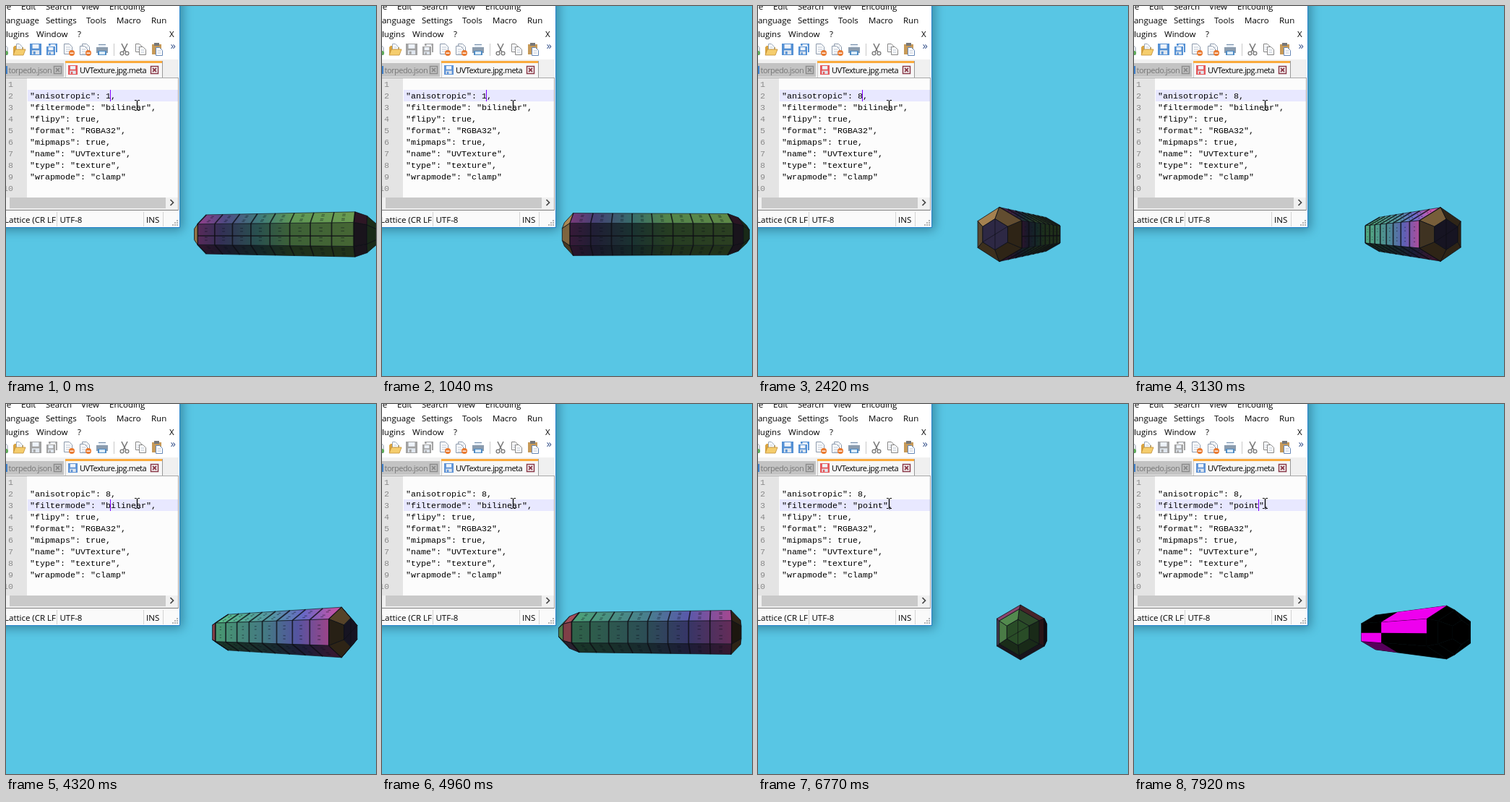
An HTML page with a canvas that plays this animation: 512 px wide and 512 px high, repeating every 8000 ms.

```html
<!DOCTYPE html>
<html lang="en">
<head>
<meta charset="utf-8">
<title>Texture settings reload</title>
<style>
html, body { margin: 0; width: 100%; height: 100%; overflow: hidden; background: #58c6e4; }
canvas { display: block; }
</style>
</head>
<body>
<canvas id="stage" width="512" height="512"></canvas>
<script>
const ctx = document.getElementById('stage').getContext('2d');
const LOOP = 8000;
const UI = '"Open Sans", "Noto Sans", sans-serif';
const MONO = '"Liberation Mono", "Noto Sans Mono", monospace';

function rect(x, y, w, h, color) {
  ctx.fillStyle = color;
  ctx.fillRect(x, y, w, h);
}

function path(points, fill, stroke, width = 1) {
  ctx.beginPath();
  points.forEach(([x, y]) => ctx.lineTo(x, y));
  if (fill) {
    ctx.closePath();
    ctx.fillStyle = fill;
    ctx.fill();
  }
  if (stroke) {
    ctx.strokeStyle = stroke;
    ctx.lineWidth = width;
    ctx.stroke();
  }
}

function disc(x, y, r, fill, stroke) {
  ctx.beginPath();
  ctx.arc(x, y, r, 0, Math.PI * 2);
  if (fill) { ctx.fillStyle = fill; ctx.fill(); }
  if (stroke) { ctx.strokeStyle = stroke; ctx.lineWidth = 1.3; ctx.stroke(); }
}

function label(str, x, y, size = 11.5, color = '#000', spacing = 0, family = UI) {
  ctx.font = size + 'px ' + family;
  ctx.letterSpacing = spacing + 'px';
  ctx.fillStyle = color;
  ctx.fillText(str, x, y);
  ctx.letterSpacing = '0px';
}

// ---- torpedo: a hexagonal prism with tapered ends ----
const CENTER = [373, 316], DIST = 450, HALF = 107, RADIUS = 29;
const RINGS = [[-134, 12.5], [-122, 23.5], [-HALF, RADIUS], [HALF, RADIUS], [119, 16]];
const BODY = 2;
const RAD = Math.PI / 180;
const TURN = [[0, 197], [17, 148], [42, 68], [51, 44.6], [76, -30], [93, -86], [105, -116]];
const SIDE_A = [[0, [90, 190, 140]], [0.45, [85, 150, 165]], [0.72, [105, 105, 200]], [1, [195, 85, 170]]];
const SIDE_B = [[0, [122, 178, 92]], [0.4, [108, 172, 96]], [0.62, [72, 140, 138]], [0.85, [90, 84, 150]], [1, [155, 74, 158]]];

// The model turns in steps and stalls while the texture reloads.
function stepAt(t) {
  if (t < 1040) return Math.min(6, Math.floor(t / 60));
  if (t < 4210) return 7 + Math.min(42, Math.floor((t - 1040) / 58.1));
  return 50 + Math.min(55, Math.floor((t - 4210) / 58.36));
}

function angleAt(t) {
  const n = stepAt(t);
  const i = Math.max(1, TURN.findIndex(k => k[0] >= n));
  const [n0, a0] = TURN[i - 1], [n1, a1] = TURN[i];
  return a0 + (a1 - a0) * (n - n0) / (n1 - n0);
}

function torpedo(t) {
  const turn = angleAt(t), missing = t >= 7420;
  const c = Math.cos(turn * RAD), s = Math.sin(turn * RAD);

  const project = (along, side, up) => {
    const k = DIST / (DIST - along * s - side * c);
    return [CENTER[0] + (along * c - side * s) * k, CENTER[1] - up * k];
  };
  const corner = (along, r, k) => {
    const a = (90 - 60 * k) * RAD;
    return project(along, r * Math.cos(a), r * Math.sin(a));
  };
  const onFace = (along, k, f) => {
    const a = (90 - 60 * k) * RAD, b = a - 60 * RAD;
    const mix = (p, q) => RADIUS * (p + (q - p) * f);
    return project(along, mix(Math.cos(a), Math.cos(b)), mix(Math.sin(a), Math.sin(b)));
  };
  const visible = pts => pts.reduce((sum, [x, y], i) => {
    const [u, v] = pts[(i + 1) % pts.length];
    return sum + x * v - u * y;
  }, 0) < 0;
  const radial = k => {
    const a = (60 - 60 * k) * RAD;
    return 0.8 * Math.cos(a) * Math.cos((turn - 80) * RAD) + 0.65 * Math.sin(a);
  };
  const axial = dir => dir * 0.8 * Math.cos((turn - 170) * RAD);
  const shade = (rgb, light) => {
    const m = 0.28 + 0.8 * Math.max(0, light);
    return `rgb(${rgb.map(v => Math.round(Math.min(255, v * m)))})`;
  };
  const INK = 'rgba(14,14,20,0.8)';
  const capFace = (pts, rgb, light) =>
    path(pts, missing ? '#000' : shade(rgb, light), missing ? '#000' : INK, missing ? 0.6 : 1);

  function bodyFace(k, pts) {
    const light = radial(k);
    if (missing) {
      path(pts, '#000', '#000', 0.6);
      const patch = (t0, t1, f0, f1, color) =>
        path([onFace(t0, k, f0), onFace(t1, k, f0), onFace(t1, k, f1), onFace(t0, k, f1)], color);
      if (k === 5) patch(-HALF, 20, 0, 1, '#ee00ee');
      if (k === 4) {
        patch(-HALF, 20, 0.47, 1, '#ee00ee');
        patch(20, HALF, 0, 0.47, '#ee00ee');
      }
      if (k === 3) patch(20, HALF, 0, 1, '#56005a');
      return;
    }
    const g = ctx.createLinearGradient(...onFace(-HALF, k, 0.5), ...onFace(HALF, k, 0.5));
    (k < 3 ? SIDE_A : SIDE_B).forEach(([at, rgb]) => g.addColorStop(at, shade(rgb, light)));
    path(pts, g, INK, 0.8);
    for (let j = 0; j <= 8; j++) {
      const at = -HALF + 2 * HALF * j / 8;
      path([onFace(at, k, 0), onFace(at, k, 1)], null, INK, 1.7);
      if (j === 8) break;
      const mid = at + HALF / 8;
      for (const f of [0.22, 0.36, 0.64, 0.78])
        path([onFace(mid - 2, k, f), onFace(mid + 2, k, f)], null, 'rgba(10,15,25,0.4)', 1.3);
    }
    if (k === 4) path([onFace(-HALF, k, 0.43), onFace(HALF, k, 0.43)], null, INK, 1.6);
  }

  for (let k = 0; k < 6; k++) {
    for (let i = 0; i < RINGS.length - 1; i++) {
      const [t0, r0] = RINGS[i], [t1, r1] = RINGS[i + 1];
      const pts = [corner(t0, r0, k), corner(t0, r0, k + 1), corner(t1, r1, k + 1), corner(t1, r1, k)];
      if (!visible(pts)) continue;
      if (i === BODY) bodyFace(k, pts);
      else if (i > BODY) capFace(pts, k === 1 ? [100, 82, 55] : [165, 130, 80], 0.7 * radial(k) + 0.7 * axial(1));
      else capFace(pts, i === 0 ? [90, 150, 85] : k < 2 ? [150, 72, 82] : k === 5 ? [150, 75, 120] : [88, 72, 100],
        0.7 * radial(k) + 0.7 * axial(-1));
    }
  }
  for (const [dir, ring, rgb] of [[-1, RINGS[0], [95, 175, 90]], [1, RINGS[4], [80, 70, 120]]]) {
    const pts = [0, 1, 2, 3, 4, 5].map(k => corner(...ring, k * dir));
    if (!visible(pts)) continue;
    capFace(pts, rgb, axial(dir));
    if (!missing) for (const k of [0, 2]) path([pts[k], pts[k + 3]], null, INK, 0.8);
  }
}

// ---- editor ----
const BLINKS = [360, 610, 790, 1040, 1290, 1540, 1790, 2040, 2600, 2850, 3100, 3350, 3600, 3780,
  4030, 4210, 4460, 4710, 4960, 5080, 6670, 6920, 7170, 7420, 7670, 7920];

function editorState(t) {
  const value = t < 2100 ? '1' : t < 2350 ? '' : '8';
  const removed = t < 5080 ? 0 : t < 5200 ? 1 : Math.min(8, 2 + Math.floor((t - 5200) / 70));
  const typed = Math.max(0, Math.min(5, Math.floor((t - 5900) / 130) + 1));
  const line = t < 4270 ? 2 : 3;
  return {
    value, line,
    mode: typed ? 'point'.slice(0, typed) : 'bilinear'.slice(removed),
    column: line === 2 ? 15 + value.length : t < 5080 ? 16 : 15 + typed,
    caret: BLINKS.filter(b => b <= t).length % 2 === 0,
    dirty: t < 300 || (t >= 2100 && t < 3420) || (t >= 5080 && t < 7360)
  };
}

function floppy(x, y, size, color) {
  rect(x, y, size, size, color);
  rect(x + size * 0.22, y + 1, size * 0.56, size * 0.36, '#eef3fa');
  rect(x + size * 0.18, y + size * 0.58, size * 0.64, size * 0.42 - 1, '#dfe6ee');
  rect(x + size * 0.3, y + size * 0.68, size * 0.18, size * 0.24, color);
}

function page(x, y, w, h, edge) {
  path([[x, y], [x + w - 4, y], [x + w, y + 4], [x + w, y + h], [x, y + h], [x, y]], '#fff', edge);
  for (let i = 4; i < h - 1; i += 3) rect(x + 2, y + i, w - 4, 1, '#b9c4d2');
}

function badge(x, y) {
  disc(x, y, 4, '#e9792f');
  rect(x - 2.5, y - 0.5, 5, 1.4, '#fff');
}

function closeBox(x, y, color) {
  ctx.strokeStyle = color;
  ctx.lineWidth = 1.5;
  ctx.strokeRect(x + 0.5, y + 0.5, 10, 10);
  path([[x + 3, y + 3], [x + 8, y + 8]], null, color, 1.8);
  path([[x + 8, y + 3], [x + 3, y + 8]], null, color, 1.8);
}

function toolbar(dirty) {
  const blue = dirty ? '#5490d4' : '#a2a2a2';
  page(-9, 53.5, 11, 14, '#8a98ab');
  disc(0, 65, 3, '#5fae58');
  path([[10, 57], [12, 55], [16, 55], [18, 57], [24, 57], [24, 67], [10, 67]], '#d9a441');
  page(14.5, 52.5, 8, 9, '#9aa8ba');
  path([[13, 60], [27, 60], [24, 68], [10, 68]], '#f5cd6d', '#c18d33', 0.8);
  floppy(33, 52, 16, blue);
  floppy(59, 52, 12, blue);
  rect(55, 55, 14, 14, '#fff');
  floppy(56, 56, 12, blue);
  page(80.5, 52.5, 11, 14, '#8a98ab');
  badge(91, 65);
  page(105.5, 52.5, 10, 12, '#8a98ab');
  page(102.5, 55.5, 10, 12, '#8a98ab');
  badge(114, 65);
  rect(128, 52, 10, 6, '#e8f0f8');
  rect(125, 57, 16, 8, '#8b9cae');
  rect(128, 53, 10, 1, '#7990aa');
  rect(127, 62, 12, 6, '#4e8bc4');
  rect(129, 63, 8, 4, '#dcecf8');
  rect(149, 52, 1, 17, '#c8c8c8');
  path([[160, 52], [166, 64]], null, '#777', 1.6);
  path([[168, 52], [162, 64]], null, '#777', 1.6);
  disc(160.5, 65.5, 2.4, null, '#777');
  disc(167.5, 65.5, 2.4, null, '#777');
  page(179.5, 52.5, 9, 11, '#858585');
  page(184.5, 56.5, 9, 11, '#858585');
  rect(202, 53, 13, 14, '#c79a58');
  rect(205, 51, 7, 4, '#777');
  page(207.5, 57.5, 9, 11, '#6687b5');
  label('»', 227.5, 60, 15, '#34508a');
}

function cursor() {
  path([[178, 130.5], [180.5, 130.5], [181.5, 131.5], [182.5, 130.5], [185, 130.5]], null, '#000');
  path([[181.5, 131], [181.5, 144]], null, '#000', 1.3);
  path([[178, 144.5], [180.5, 144.5], [181.5, 143.5], [182.5, 144.5], [185, 144.5]], null, '#000');
}

function tabs(dirty) {
  rect(0, 74, 239, 25, '#f0f0f0');
  rect(0, 79, 80, 19, '#c3c3c3');
  rect(0, 83, 2, 11, '#3f7fc8');
  label('torpedo.json', 3.5, 93, 11, '#777', -0.5);
  closeBox(66, 83, '#8b8b8b');
  rect(82, 76, 135, 23, '#f7f7f7');
  rect(82, 76, 135, 3, '#faaa3c');
  rect(216, 76, 1, 23, '#999');
  rect(82, 79, 1, 20, '#ccc');
  floppy(86, 82, 13, dirty ? '#e4575a' : '#5d92d6');
  label('UVTexture.jpg.meta', 102, 93, 11, '#000', -0.46);
  closeBox(200, 83, '#8a3a4a');
}

function code(state) {
  rect(0, 99, 239, 166, '#fcfcfc');
  rect(0, 99, 29, 166, '#e4e4e4');
  rect(0, 99, 239, 1, '#a8a8a8');
  rect(30, 100 + 16 * (state.line - 1), 208, 16, '#e8e8ff');
  const lines = ['', `"anisotropic": ${state.value},`, `"filtermode": "${state.mode}",`, '"flipy": true,',
    '"format": "RGBA32",', '"mipmaps": true,', '"name": "UVTexture",', '"type": "texture",',
    '"wrapmode": "clamp"', ''];
  lines.forEach((text, i) => {
    const y = 112 + 16 * i;
    label(String(i + 1), i === 9 ? -4 : 3, y, 11.67, '#8a8a8a', 0, MONO);
    label(text, 33, y, 11.67, '#000', 0, MONO);
  });
  if (state.caret) rect(32 + 7 * state.column, 100 + 16 * (state.line - 1), 1, 16, '#8000ff');
}

function statusBar() {
  rect(0, 265, 239, 17, '#f0f0f0');
  rect(5, 265, 216, 15, '#c9c9c9');
  path([[227.5, 268], [231.5, 272], [227.5, 276]], null, '#444', 1.7);
  rect(0, 283, 239, 23, '#fafafa');
  rect(0, 282, 239, 1, '#7c7c7c');
  ctx.textAlign = 'right';
  label('Lattice (CR LF', 69, 300);
  ctx.textAlign = 'left';
  label('UTF-8', 74.5, 300);
  label('INS', 194, 300);
  for (const x of [70, 190, 217]) rect(x, 285, 1, 20, '#d4d4d4');
  for (let i = 0; i < 3; i++)
    for (let j = 0; j <= i; j++) rect(236 - 3 * j, 296 + 3 * i, 2, 2, '#b5b5b5');
}

function editor(t) {
  const state = editorState(t);
  ctx.save();
  ctx.shadowColor = 'rgba(0,30,50,0.4)';
  ctx.shadowBlur = 14;
  ctx.shadowOffsetX = 3;
  ctx.shadowOffsetY = 3;
  rect(-30, -30, 271, 337, '#2582cc');
  ctx.restore();
  rect(0, 0, 240, 306, '#fff');

  const menu = [['File', -11, 5], ['Edit', 21, 5], ['Search', 55, 5], ['View', 104, 5], ['Encoding', 143, 5],
    ['Language', -6, 24], ['Settings', 55, 24], ['Tools', 111, 24], ['Macro', 153, 24], ['Run', 201, 24],
    ['Plugins', -7, 43], ['Window', 42, 43], ['?', 99, 43], ['X', 226, 43]];
  menu.forEach(([text, x, y]) => label(text, x, y));
  toolbar(state.dirty);
  tabs(state.dirty);
  code(state);
  statusBar();
  rect(238, 99, 1, 184, '#a0a0a0');
  cursor();
}

function draw(now) {
  const t = now % LOOP;
  rect(0, 0, 512, 512, '#58c6e4');
  torpedo(t);
  editor(t);
}

const start = performance.now();
function frame() {
  draw(performance.now() - start);
  requestAnimationFrame(frame);
}
frame();
</script>
</body>
</html>
```
